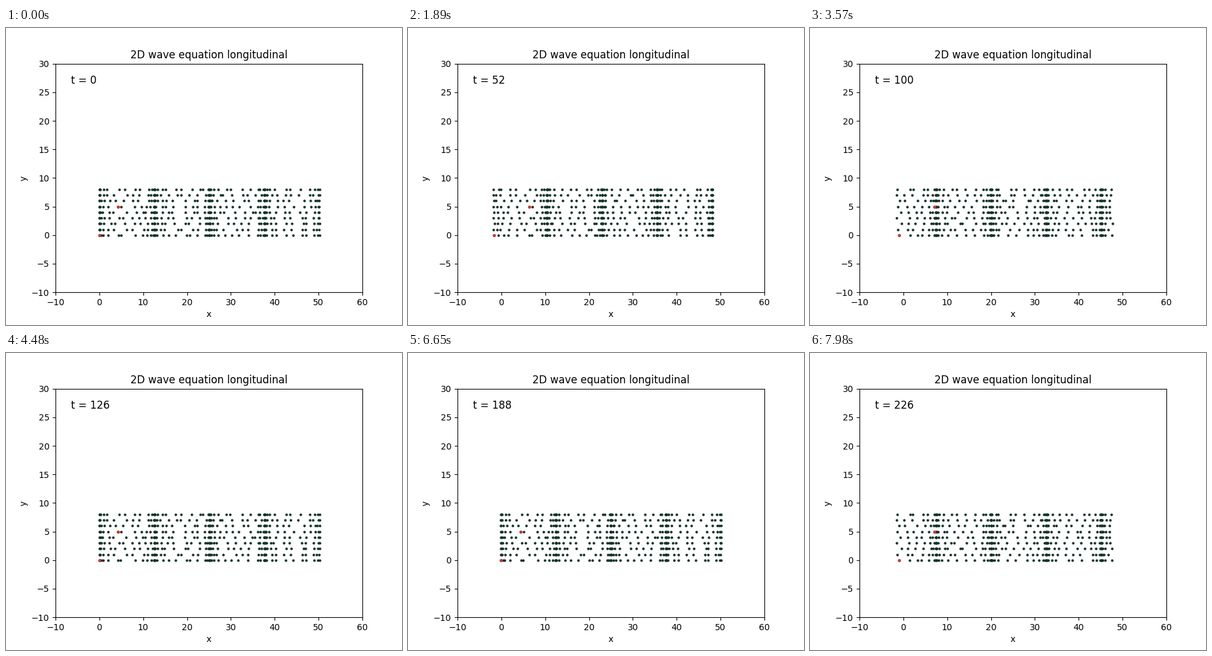
A matplotlib script that plays this animation: 640x480 px, repeating every 8000 ms.

```python
import numpy as np
import matplotlib.pyplot as plt
from matplotlib.animation import FuncAnimation

LOOP_MS, FRAMES = 8000, 115
ROWS, COLS = 9, 50
AMP, K, OMEGA = 2.0, 0.5, 0.1
DOT, RED = "#14322a", "#cc3d22"

# Rest positions: a unit lattice with sideways jitter.
rng = np.random.default_rng(7)
rest = np.arange(COLS) + rng.uniform(-0.42, 0.42, (ROWS, COLS))
height = np.repeat(np.arange(ROWS), COLS)

# The two highlighted particles sit on the lattice diagonal.
marked = [0, 5]
rest[marked, marked] = 0.10, 5.27


def displaced(t):
    return rest + AMP * np.sin(OMEGA * t - K * rest)


fig, ax = plt.subplots(figsize=(6.4, 4.8), dpi=100)
ax.set(xlim=(-10, 60), ylim=(-10, 30), xlabel="x", ylabel="y",
       title="2D wave equation longitudinal")
dots, = ax.plot([], [], "o", color=DOT, markersize=2)
marks, = ax.plot([], [], "o", color=RED, markersize=2.6)
clock = ax.text(-6.5, 26.5, "", fontsize=12)


def update(frame):
    t = 2 * max(frame - 1, 0)  # the opening state is held for two frames
    x = displaced(t)
    dots.set_data(x.ravel(), height)
    marks.set_data(x[marked, marked], marked)
    clock.set_text(f"t = {t}")
    return dots, marks, clock


anim = FuncAnimation(fig, update, frames=FRAMES, interval=LOOP_MS / FRAMES,
                     init_func=lambda: update(0), repeat=True, repeat_delay=0)
plt.show()
```
